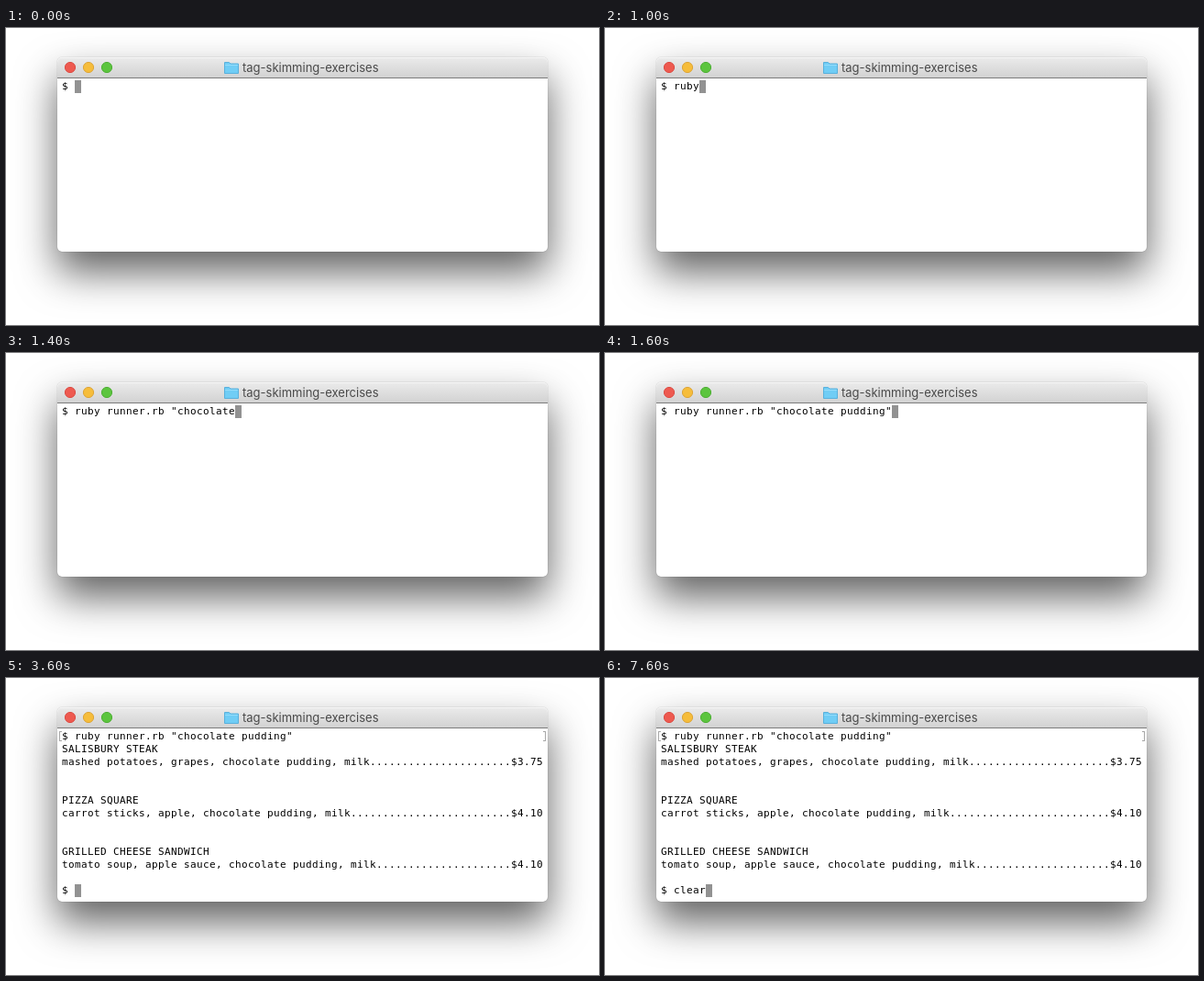
Write an HTML page that moves like this. It is 647x324 px and loops after 8 s.

```html
<!DOCTYPE html>
<html lang="en">
<head>
<meta charset="utf-8">
<title>Terminal</title>
<style>
  html, body { margin: 0; width: 100%; height: 100%; overflow: hidden; background: #fff; }
  .window {
    position: absolute; left: 56px; top: 32px; width: 535px; height: 212px;
    border-radius: 5px; background: #fff;
    box-shadow: 0 0 1px rgba(0, 0, 0, .45), 0 22px 44px rgba(0, 0, 0, .62);
  }
  .bar {
    height: 22px; border-bottom: 1px solid #7c7c7c; border-radius: 5px 5px 0 0;
    background: linear-gradient(#ebebeb, #d2d2d2); box-shadow: inset 0 1px #f5f5f5;
  }
  .bar svg { position: absolute; left: 0; top: 0; }
  .title {
    position: absolute; left: 202px; top: 0; line-height: 23px; white-space: nowrap;
    font-family: Inter, Roboto, sans-serif; font-size: 13px; color: #4a4a4a;
  }
  pre {
    position: absolute; left: 5px; top: 25px; margin: 0; color: #000;
    font: 11px/14px "DejaVu Sans Mono", monospace;
  }
  .cursor {
    display: inline-block; width: 7px; height: 14px;
    vertical-align: top; background: #929292;
  }
  .mark {
    position: absolute; top: 26px; width: 2px; height: 9px; left: 2px;
    border: 1px solid #a8a8a8; border-right: 0;
  }
  .mark.end { left: 530px; transform: scaleX(-1); }
</style>
</head>
<body>
<div class="window">
  <div class="bar">
    <svg width="535" height="22">
      <g stroke-width="1">
        <circle cx="14" cy="11" r="5.6" fill="#ee5a50" stroke="#dc4a42"/>
        <circle cx="34" cy="11" r="5.6" fill="#f6bd3b" stroke="#dda435"/>
        <circle cx="54" cy="11" r="5.6" fill="#5cc53e" stroke="#4cae33"/>
      </g>
      <path d="M182.5 17.5v-12h5l1.5 1.5h8.500v10.500z" fill="#70cdf5" stroke="#58b0dc"/>
      <path d="M183 8.500h14" stroke="#93dcfa"/>
    </svg>
    <div class="title">tag-skimming-exercises</div>
  </div>
  <div class="mark"></div>
  <div class="mark end"></div>
  <pre><span id="text"></span><span class="cursor"></span></pre>
</div>
<script>
const LOOP = 8000, CELL = 7;
const text = document.getElementById('text');
const marks = document.querySelectorAll('.mark');

// Snap the monospaced font to the terminal's whole-pixel cells.
text.textContent = '0'.repeat(100);
const advance = text.getBoundingClientRect().width / 100;
text.style.letterSpacing = CELL - advance + 'px';

const dish = (name, sides, price) => `${name}\n${sides.padEnd(70, '.')}${price}\n`;
const command = '$ ruby runner.rb "chocolate pudding"';
const output = [
  command,
  [
    dish('SALISBURY STEAK', 'mashed potatoes, grapes, chocolate pudding, milk', '$3.75'),
    dish('PIZZA SQUARE', 'carrot sticks, apple, chocolate pudding, milk', '$4.10'),
    dish('GRILLED CHEESE SANDWICH', 'tomato soup, apple sauce, chocolate pudding, milk', '$4.10')
  ].join('\n\n'),
  '$ '
].join('\n');

// [start time, screen content before the cursor]
const steps = [
  [0, '$ '],
  [1000, command.slice(0, 6)],
  [1200, command.slice(0, 16)],
  [1400, command.slice(0, 27)],
  [1600, command],
  [3600, output],
  [7600, output + 'clear']
];

let shown;
function draw(now) {
  const t = now % LOOP;
  const step = steps.findLast(([start]) => start <= t);
  if (step !== shown) {
    shown = step;
    text.textContent = step[1];
    marks.forEach(m => m.hidden = step[0] < 3600);
  }
}

let begin;
function tick(now) {
  begin ??= now;
  draw(Math.max(0, now - begin));
  requestAnimationFrame(tick);
}
draw(0);
requestAnimationFrame(tick);
</script>
</body>
</html>
```
